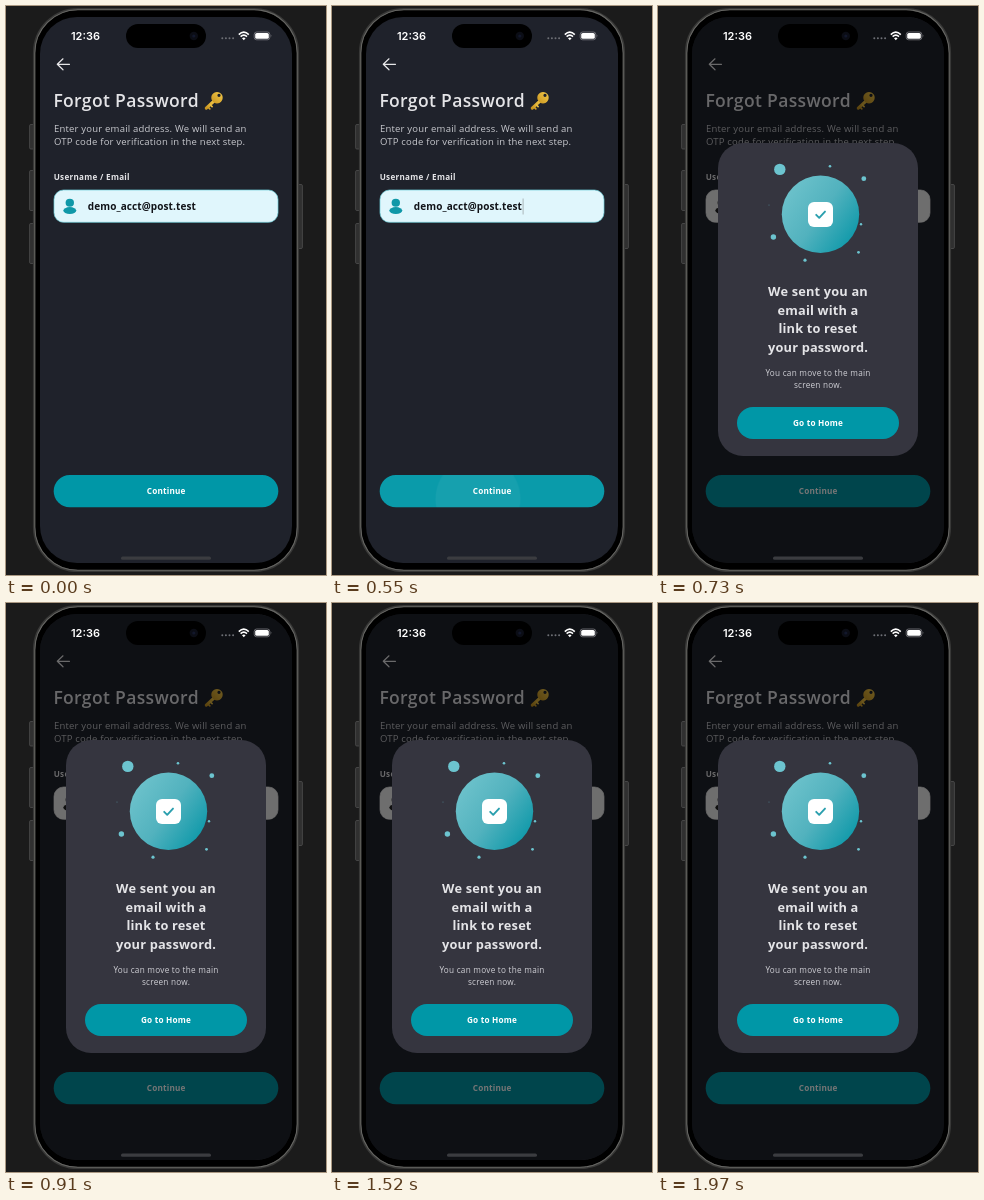
Animation of 320x569 px, one loop 2000 ms. Source, as an HTML page:

```html
<!DOCTYPE html>
<html lang="en">
<head>
<meta charset="utf-8">
<title>Forgot password</title>
<style>
  html, body { margin: 0; width: 100%; height: 100%; overflow: hidden; background: #1b1b1b; }
  svg { display: block; width: 100%; height: 100%; }
  text { font-family: "Open Sans", sans-serif; fill: #e4e4e7; white-space: pre; }
  .bold { font-weight: 700; }
  .mid { text-anchor: middle; }
  .title { font-size: 17.5px; font-weight: 600; letter-spacing: .35px; }
  .lead { font-size: 9.5px; letter-spacing: .21px; fill: #c9cacf; }
  .label { font-size: 8.1px; letter-spacing: .3px; }
  .value { font-size: 10px; letter-spacing: .1px; fill: #111318; }
  .action { font-size: 8.2px; letter-spacing: .2px; fill: #fff; }
  .head { font-size: 12.8px; letter-spacing: .18px; }
  .note { font-size: 8.2px; letter-spacing: .26px; fill: #d0d0d6; }
  .clock { font: 600 11px Inter, sans-serif; fill: #fff; }
  .teal { fill: #0097a7; }

  .caret, .ripple, .press, .shade, .dialog, .box, .person {
    animation: 2000ms linear infinite;
  }
  .caret { animation-name: caret; }
  .ripple { animation-name: ripple; transform-origin: 146px 493px; }
  .press { animation-name: press; }
  .shade { animation-name: shade; }
  .dialog { animation-name: dialog; }
  .box { animation-name: box; }
  .person { animation-name: person; }

  @keyframes caret {
    0%, 4.5% { opacity: 0; }
    15%, 28.7% { opacity: .5; }
    28.75%, 100% { opacity: 0; }
  }
  @keyframes ripple {
    0%, 10% { transform: scale(0); opacity: 1; }
    27.5% { transform: scale(1); opacity: 1; }
    28.7% { transform: scale(1.08); opacity: 1; }
    28.75%, 100% { transform: scale(1.08); opacity: 0; }
  }
  @keyframes press {
    0%, 10% { opacity: 0; }
    18%, 28.7% { opacity: .04; }
    32%, 100% { opacity: 0; }
  }
  @keyframes shade {
    0%, 28.7% { opacity: 0; }
    28.75%, 29% { opacity: .51; }
    31%, 100% { opacity: .54; }
  }
  @keyframes dialog {
    0%, 28.7% { opacity: 0; }
    28.75%, 29% { opacity: .9; }
    31%, 100% { opacity: 1; }
  }
  @keyframes box {
    0%, 28.7% { fill: #e0f6fc; stroke: #6fcfda; }
    28.75%, 29% { fill: #e6eeee; stroke: #7fc4cc; }
    31%, 100% { fill: #f0f0f0; stroke: #f0f0f0; }
  }
  @keyframes person {
    0%, 28.7% { fill: #0f98a8; }
    28.75%, 29% { fill: #24474d; }
    31%, 100% { fill: #222; }
  }
</style>
</head>
<body>
<svg viewBox="0 0 320 569" preserveAspectRatio="none">
  <defs>
    <linearGradient id="orb" x1="0" y1=".15" x2="1" y2=".85">
      <stop offset="0" stop-color="#70c4cd"/>
      <stop offset=".5" stop-color="#52b2be"/>
      <stop offset="1" stop-color="#0796a7"/>
    </linearGradient>
    <linearGradient id="gold" x1="1" y1="0" x2="0" y2="1">
      <stop offset="0" stop-color="#f3c94a"/>
      <stop offset="1" stop-color="#c9951f"/>
    </linearGradient>
    <clipPath id="screen"><rect x="34" y="11" width="252" height="546" rx="37"/></clipPath>
    <clipPath id="pill"><rect x="47.7" y="469" width="224.6" height="32.3" rx="16.1"/></clipPath>
  </defs>

  <rect width="320" height="569" fill="#1b1b1b"/>

  <!-- phone body -->
  <g fill="#303030" stroke="#555" stroke-width=".7">
    <rect x="23.6" y="118.5" width="5" height="24.5" rx="1.2"/>
    <rect x="23.6" y="164.5" width="5" height="40" rx="1.2"/>
    <rect x="23.6" y="217.5" width="5" height="40" rx="1.2"/>
    <rect x="291.4" y="178.5" width="5" height="64" rx="1.2"/>
  </g>
  <rect x="28" y="3" width="264" height="562" rx="44" fill="#000" stroke="#383837" stroke-width="2.2"/>
  <rect x="28.8" y="3.8" width="262.4" height="560.4" rx="43.2" fill="none" stroke="#656562" stroke-width="1.1"/>

  <g clip-path="url(#screen)">
    <rect x="34" y="11" width="252" height="546" fill="#1f222b"/>
    <path d="M63.5 58.3H51.5M57 52.8L51.3 58.3L57 63.8" fill="none" stroke="#e6e6e8" stroke-width="1.2" stroke-linecap="round" stroke-linejoin="round"/>

    <text class="title" x="47.4" y="101">Forgot Password</text>
    <g fill="none" stroke="url(#gold)" stroke-linecap="round">
      <path d="M208.2 94.8L200.3 102.2" stroke-width="3.1"/>
      <path d="M202 101.2l1.8 1.7M204.3 99l1.8 1.7" stroke-width="1.7"/>
    </g>
    <path fill="url(#gold)" fill-rule="evenodd" d="M211 86a5.7 5.7 0 1 1 -.01 0zM213 87.8a1.6 1.6 0 1 0 .01 0z"/>

    <text class="lead" x="47.9" y="126">Enter your email address. We will send an</text>
    <text class="lead" x="47.9" y="139.4">OTP code for verification in the next step.</text>
    <text class="bold label" x="47.7" y="173.5">Username / Email</text>

    <rect class="box" x="48" y="184" width="224" height="32.3" rx="9.5" stroke-width=".7"/>
    <g class="person">
      <ellipse cx="63.8" cy="196.7" rx="4.2" ry="4"/>
      <ellipse cx="63.8" cy="204.6" rx="6.5" ry="3.5"/>
    </g>
    <text class="bold value" x="81.8" y="204">demo_acct@post.test</text>
    <rect class="caret" x="190.6" y="192.5" width="1" height="16" fill="#777"/>

    <g clip-path="url(#pill)">
      <rect class="teal" x="47" y="468" width="226" height="34"/>
      <rect class="press" x="47" y="468" width="226" height="34" fill="#fff"/>
      <circle class="ripple" cx="146" cy="493" r="42.5" fill="#fff" fill-opacity=".05"/>
    </g>
    <text class="bold action mid" x="160.2" y="488">Continue</text>

    <rect class="shade" x="34" y="11" width="252" height="546" fill="#000"/>

    <rect class="dialog" x="60" y="137" width="200" height="313" rx="25" fill="#35353f"/>
    <g class="dialog">
      <circle cx="162.5" cy="208.3" r="38.7" fill="url(#orb)"/>
      <g fill="#6cc4cf">
        <circle cx="121.8" cy="163.4" r="5.7"/>
        <circle cx="172" cy="160.3" r="1.3"/>
        <circle cx="205.8" cy="172.7" r="2.4"/>
        <circle cx="203" cy="218.3" r="1.2"/>
        <circle cx="200.5" cy="246.3" r="1.4"/>
        <circle cx="147" cy="254.2" r="1.6"/>
        <circle cx="115.4" cy="231" r="2.7"/>
        <circle cx="111" cy="199" r=".6" opacity=".5"/>
      </g>
      <rect x="150" y="196" width="25" height="25" rx="6" fill="#fff"/>
      <path d="M158.2 208.8L161.2 211.8L167 205.6" fill="none" stroke="#2a9fae" stroke-width="1.9" stroke-linecap="round" stroke-linejoin="round"/>

      <g class="bold head mid">
        <text x="160" y="290">We sent you an</text>
        <text x="160" y="308.5">email with a</text>
        <text x="160" y="327">link to reset</text>
        <text x="160" y="345.7">your password.</text>
      </g>
      <text class="note mid" x="160" y="370">You can move to the main</text>
      <text class="note mid" x="160" y="382.3">screen now.</text>
      <rect class="teal" x="79" y="401" width="162" height="32" rx="16"/>
      <text class="bold action mid" x="160" y="419.5">Go to Home</text>
    </g>

    <rect x="115" y="550.5" width="90" height="3.3" rx="1.65" fill="#3b3c40"/>
  </g>

  <!-- status bar -->
  <rect x="120" y="18" width="80" height="24" rx="12" fill="#000"/>
  <circle cx="187.8" cy="30" r="4.2" fill="#0b0d15"/>
  <circle cx="187.8" cy="30" r="1.6" fill="#12172b"/>
  <text class="clock mid" x="79.5" y="34">12:36</text>
  <path d="M216.3 32.3H228" stroke="#6d6f75" stroke-width="2" stroke-linecap="round" stroke-dasharray="0 3.6"/>
  <g fill="none" stroke="#fff" stroke-width="1.6">
    <path d="M232.8 28.6Q237.8 23.8 242.8 28.6"/>
    <path d="M234.6 30.7Q237.8 27.7 241 30.7"/>
  </g>
  <path d="M236 32.2Q237.8 30.6 239.6 32.2L237.8 34.2z" fill="#fff"/>
  <rect x="248.2" y="26" width="15.6" height="7.8" rx="2.4" fill="none" stroke="#8b8c91" stroke-width=".7"/>
  <rect x="249.2" y="27" width="13.6" height="5.8" rx="1.6" fill="#fff"/>
  <path d="M264.8 28.6q1.2 1.3 0 2.6z" fill="#8b8c91"/>
</svg>
</body>
</html>
```
